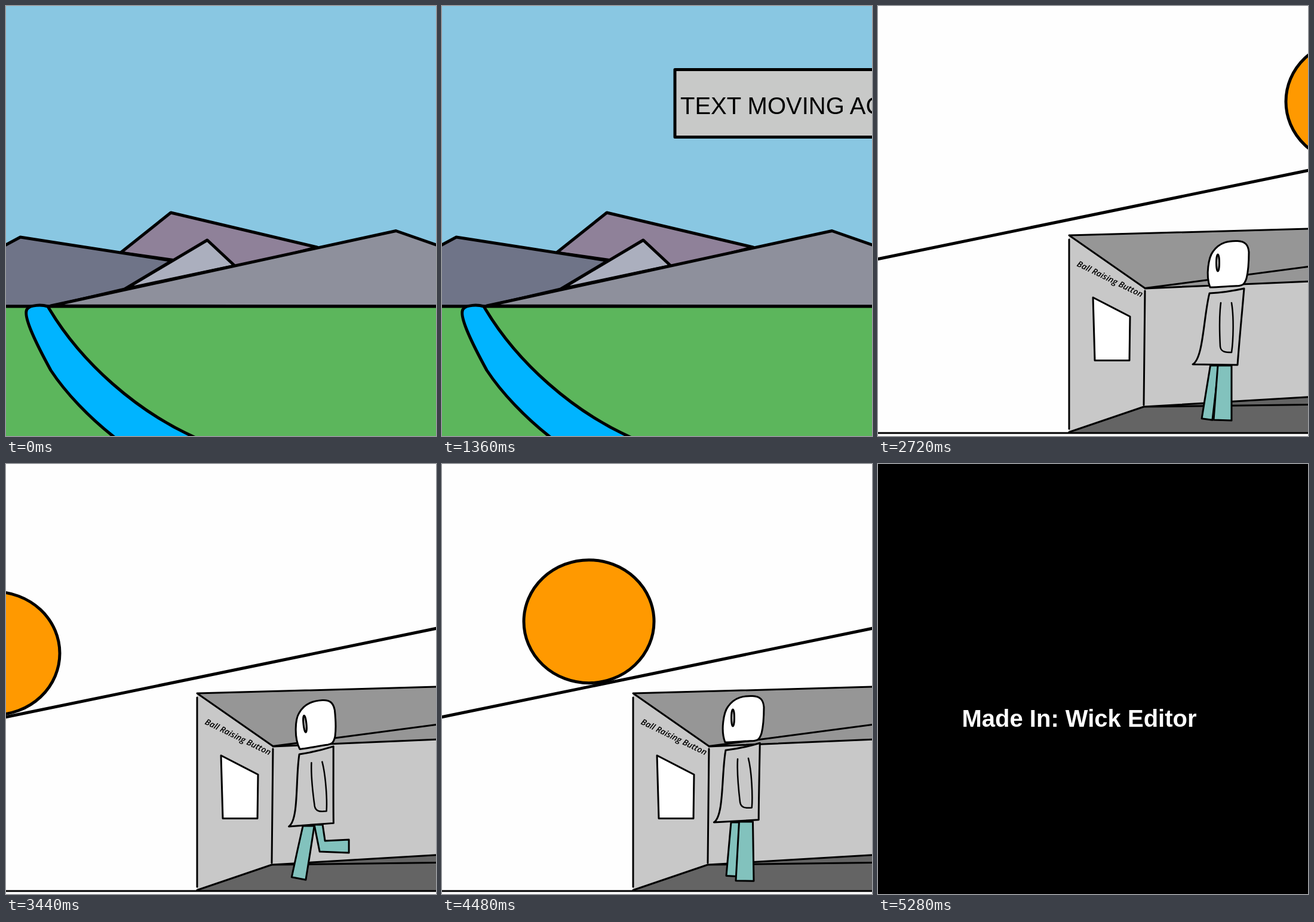
An HTML page that plays this animation: 720 by 720 pixels, repeating every 6320 ms.

```html
<!DOCTYPE html>
<html lang="en">
<head>
<meta charset="utf-8">
<title>Moving text and a rolling ball</title>
<style>
  html, body { margin: 0; width: 100%; height: 100%; overflow: hidden; background: #000; }
  svg { display: block; width: 100vw; height: 100vh; }
  .ink { stroke: #000; stroke-width: 5; stroke-linejoin: round; stroke-linecap: round; }
  .thin { stroke: #000; stroke-width: 3; stroke-linejoin: round; stroke-linecap: round; }
  .sans { font-family: "Liberation Sans", Arial, sans-serif; font-size: 40px; }
  .serif { font-family: "Liberation Serif", "Times New Roman", serif; font-size: 39.7px; }
  .label { font: italic 600 14px "Open Sans", "Noto Sans", sans-serif; }
</style>
</head>
<body>
<svg viewBox="0 0 720 720" xmlns="http://www.w3.org/2000/svg">
  <g id="valley">
    <rect width="720" height="720" fill="#89c7e2"/>
    <g class="ink">
      <path d="M192 413L276 346L521 404L383 440Z" fill="#8f8199"/>
      <path d="M-6 403L24 387L278 426.500L199 474L75 503H-6Z" fill="#6f7488"/>
      <path d="M199 474L337 392L383 435Z" fill="#abafbe"/>
      <path d="M75 502L653 376.500L726 402V503Z" fill="#8e909c"/>
      <path d="M-6 503H726V726H-6Z" fill="#5cb65c"/>
      <path d="M70 503C60 500 40 500 35 508C28 520 52 568 75 610C100 648 140 690 184 724L320 724C220 680 125 597 70 503Z" fill="#00b4ff"/>
    </g>
    <g id="banner">
      <rect class="ink" x="-10" y="106.500" width="740" height="113" fill="#c8c9c8"/>
      <text class="sans" x="-1" y="181">TEXT MOVING ACROSS THE SCREEN</text>
    </g>
  </g>

  <g id="lab">
    <rect width="720" height="720" fill="#fefefe"/>
    <ellipse id="ball" class="ink" rx="109" ry="103" fill="#ff9900"/>
    <path class="ink" d="M-4 424.500L724 274.500" fill="none"/>
    <path d="M320 384L724 373V461L447 473Z" fill="#969696"/>
    <path d="M447 473L724 461V654L445 671Z" fill="#c8c8c8"/>
    <path d="M320 384L447 473L445 671L320 714Z" fill="#c8c8c8"/>
    <path d="M320 714L445 671L724 654V714Z" fill="#646464"/>
    <g class="thin" fill="none">
      <path d="M-4 715H724M320 391V708M320 384L724 373M320 384L447 472.500L724 436M447 473L724 461"/>
      <path d="M447 477L445 668M320 713.500L445 671L724 654.500M445 671L724 667.500"/>
      <path d="M360 488L422 520L421 593.500H363Z" fill="#fff"/>
    </g>
    <text class="label" transform="translate(332 435) rotate(26)">Ball Raising Button</text>
    <g class="thin">
      <g id="legs" fill="#82c2bd">
        <path id="far"/>
        <path id="near"/>
      </g>
      <g id="body">
        <path d="M555 481C575 480 595 477 613 473C609 520 605 560 602 601L527 600C545 590 545 520 555 481Z" fill="#c8c8c8"/>
        <path d="M574 497C571 520 572 550 573 570C574 580 583 580 592 580C595 560 596 520 592 497" fill="none" stroke-width="2.500"/>
      </g>
      <g id="head">
        <path d="M556 471C548 450 554 420 561 411C572 395 588 393 602 393.500C615 394 620 400 621 412C621 430 619 448 617 456C613 468 609 468 604 468.500C588 469 570 471 556 471Z" fill="#fff"/>
        <ellipse cx="569" cy="430" rx="2.500" ry="14" fill="#c8c8c8"/>
      </g>
    </g>
  </g>

  <g id="card1">
    <rect width="720" height="720"/>
    <text class="serif" x="118.500" y="320" fill="#fff" stroke="#fff" stroke-width=".5">NOW FOR SOME MORE STUFF</text>
  </g>
  <g id="card2">
    <rect width="720" height="720"/>
    <text class="sans" x="140.500" y="439.500" fill="#fff" font-weight="bold">Made In: Wick Editor</text>
  </g>
</svg>
<script>
const LOOP = 6320, STEP = 80;
const el = id => document.getElementById(id);
const scenes = ["valley", "card1", "lab", "card2"].map(el);
const [banner, ball, legs, far, near, body, head] =
  ["banner", "ball", "legs", "far", "near", "body", "head"].map(el);

// 0 before step a, 1 after step b, linear between
const ramp = (n, a, b) => Math.min(1, Math.max(0, (n - a) / (b - a)));
const middle = (p, q) => [(p[0] + q[0]) / 2, (p[1] + q[1]) / 2];
const move = (node, x, y, turn = 0, cx = 0, cy = 0) =>
  node.setAttribute("transform", `translate(${x} ${y}) rotate(${turn} ${cx} ${cy})`);

// Outline of a bent limb with half-widths w0 at the hip and w1 at the foot
function limb(hip, knee, foot, w0, w1) {
  const a = Math.atan2(foot[1] - knee[1], foot[0] - knee[0]);
  const out = [Math.sin(a), -Math.cos(a)];
  const w = (w0 + w1) / 2;
  const side = s => [
    [hip[0] + s * w0, hip[1]],
    [knee[0] + s * w * (1 + out[0]) / 2, knee[1] + s * w * out[1]],
    [foot[0] + s * w1 * out[0], foot[1] + s * w1 * out[1]]
  ];
  return `M${[...side(1), ...side(-1).reverse()].join(" ")}Z`;
}

function drawBall(n) {
  const down = ramp(n, 34, 41), up = ramp(n, 51, 66);
  ball.setAttribute("cx", 792 - 811 * down + 795 * up);
  ball.setAttribute("cy", 160 + 157 * down - 160 * up);
}

function drawWalker(n) {
  const lean = ramp(n, 34, 43);
  const bend = n < 46 ? Math.sin(Math.PI * (n - 34) / 6) ** 2 : 0;
  const x = -68 * ramp(n, 34, 44.4) - 12 * ramp(n, 48, 60);
  const y = 2 * bend - 4 * ramp(n, 43, 47);

  move(body, x, y, -4 * lean - bend, 586, 540);
  move(head, x - 6 * lean - 3.5 * bend, y - lean + 2.5 * bend, -6 * bend, 586, 432);
  move(legs, x, 0);

  const hip = [563.5 + 3.5 * lean + 15 * bend, 602 - 2 * lean + 4 * bend];
  const foot = [551 + 10 * lean + 72 * bend, 692 - 2 * lean - 50 * bend];
  const [kx, ky] = middle(hip, foot);
  far.setAttribute("d", limb(hip, [kx - 19 * bend, ky + 18 * bend], foot, 7, 9 + 2 * bend));

  const hip2 = [580.5 + 4.5 * lean - 19.5 * bend, 602 - 3 * lean + 7 * bend];
  const foot2 = [577 + 6 * lean - 34 * bend, 693.5 + 4.5 * lean - 4 * bend];
  near.setAttribute("d", limb(hip2, middle(hip2, foot2), foot2, 11.5 - 2 * bend, 15 - 3 * bend));
}

function draw(time) {
  const n = Math.floor((time % LOOP) / STEP);
  const scene = n < 21 ? 0 : n < 34 ? 1 : n < 66 ? 2 : 3;
  scenes.forEach((node, i) => node.style.display = i === scene ? "" : "none");
  if (scene === 0) move(banner, 80 * (n < 3 ? -12 : n - 12), 0);
  if (scene === 2) {
    drawBall(n);
    drawWalker(n);
  }
}

let start;
function tick(now) {
  start ??= now;
  draw(now - start);
  requestAnimationFrame(tick);
}
draw(0);
requestAnimationFrame(tick);
</script>
</body>
</html>
```
